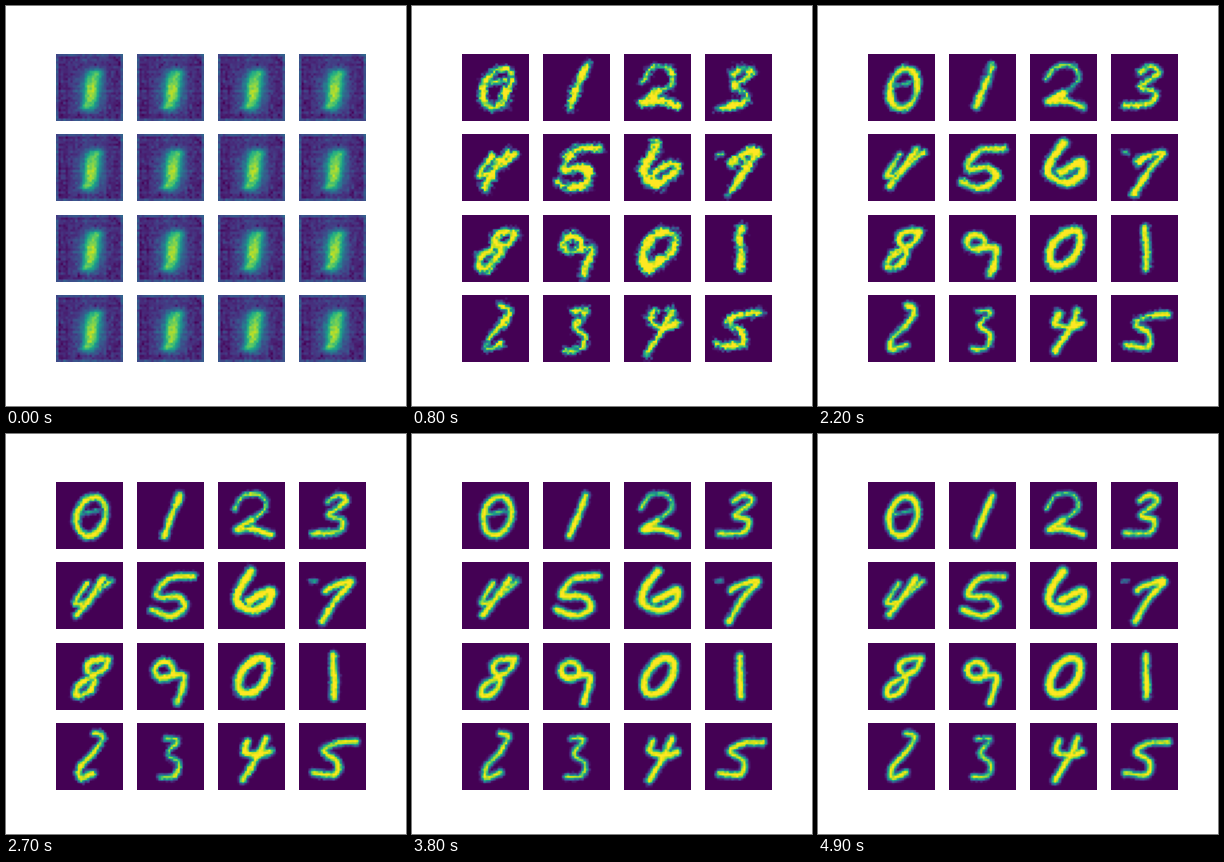
A matplotlib script for the animation above (5.2 s loop, 400 px wide and 400 px high).

```python
import numpy as np
import matplotlib.pyplot as plt
from matplotlib.animation import FuncAnimation

SIZE = 28
LAST = 49
FRAMES = 52
YY, XX = np.mgrid[0:SIZE, 0:SIZE] + 0.5


def line(*coords, ink=1.45):
    """Catmull-Rom stroke through a few key points."""
    points = np.array(coords, float).reshape(-1, 2)
    p = np.vstack([points[0], points, points[-1]])
    t = np.linspace(0, 1, 48 // (len(points) - 1) + 2)[:, None]
    curve = [0.5 * (2 * b + (c - a) * t + (2 * a - 5 * b + 4 * c - d) * t**2
                    + (3 * b - a - 3 * c + d) * t**3)
             for a, b, c, d in zip(p, p[1:], p[2:], p[3:])]
    return np.vstack(curve), ink


def ring(cx, cy, rx, ry, slant=0.0, ink=1.45):
    t = np.linspace(0, 2 * np.pi, 50)
    x = cx + rx * np.cos(t) - slant * ry * np.sin(t)
    return np.column_stack([x, cy + ry * np.sin(t)]), ink


def distance(curve, x, y):
    return np.hypot(x[..., None] - curve[:, 0], y[..., None] - curve[:, 1]).min(axis=2)


def logistic(x):
    return 1 / (1 + np.exp(-np.clip(x, -30, 30)))


def zero():
    return [ring(14.8, 14.3, 5.8, 8.1, 0.15), line(11.5, 13.5, 18, 12, ink=0.4)]


def slanted_zero():
    return [ring(14.7, 13.8, 5.6, 7.6, 0.4, ink=1.85)]


def one(top, bottom):
    return [line(top, 5.5, bottom, 22.5)]


def two():
    return [line(7, 11, 11, 5.5, 18, 5.5, 20, 11, 14, 16, ink=0.7),
            line(14, 16, 8, 20, 14, 19.5, 22, 22)]


def curly_two():
    return [line(16, 4.5, 19.5, 6, 16, 12, 10.5, 18, 10, 23, 16, 20.5, ink=1.2)]


def three():
    return [line(12, 8, 16, 5.5, 19.5, 8, 12.5, 14, 18, 16, 16, 21, 6, 21.5, ink=1.2)]


def faint_three():
    return [line(12, 6.5, 17, 7, 13, 13, 17.5, 17, 16, 22, 10, 22.5, ink=0.9)]


def slanted_four():
    return [line(13, 9, 8, 17, 13, 16, 23, 8, ink=1.1), line(20, 7, 15, 14, 9, 22)]


def four():
    return [line(12, 7.5, 11, 12, 17, 13.5, 22, 12), line(20, 6.5, 17, 13, 10.5, 24)]


def five():
    return [line(23, 6, 13, 7, 8, 14, 17, 14.5, 20, 19, 14, 22.5, 6, 20)]


def wide_five():
    return [line(24, 8, 16, 8.5, 10.5, 12, 16, 16, 15, 21.5, 6, 21, ink=1.25)]


def six():
    return [line(14, 4, 9, 11, 8, 17, 14, 20, 21, 17, 22, 12, 13, 16, ink=1.85)]


def seven():
    return [line(11, 12, 14, 10, 22, 8, 16, 15, 10, 25), line(5, 8, 7, 8, ink=0.2)]


def eight():
    return [line(22, 6.5, 15, 7.5, 13, 11, 16, 15.5, 13, 21, 8.5, 22, 9, 18, 15, 14, 20, 11, 22, 6.5)]


def nine():
    return [ring(11.5, 11.5, 3.8, 3.4), line(12, 14.5, 19.5, 13.5, 19, 19, 17, 25)]


CELLS = [zero(), one(18, 11.3), two(), three(),
         slanted_four(), five(), six(), seven(),
         eight(), nine(), slanted_zero(), one(14.5, 14.8),
         curly_two(), faint_three(), four(), wide_five()]


def drift(seed, frame, scale):
    """Smooth random field that wanders as the frames go by."""
    rng = np.random.default_rng(seed)
    field = np.zeros((SIZE, SIZE))
    for _ in range(5):
        kx, ky = rng.uniform(-1, 1, 2) * scale
        phase, speed = rng.uniform(0, 6.28), rng.uniform(-1, 1)
        field += np.sin(kx * XX + ky * YY + phase + speed * frame)
    return field / 2


def make_blob(index):
    """Untrained output: a glowing column on a faintly patterned ground."""
    shared = np.random.default_rng(4)
    own = np.random.default_rng(index)
    axis = 15.2 - 0.13 * (YY - 14.5)
    column = logistic((2.6 - np.abs(XX - axis)) / 0.8) * logistic((8.2 - np.abs(YY - 15)) / 0.8)
    serif = np.exp(-((XX - 18) / 2) ** 2 - ((YY - 8) / 1.3) ** 2)
    foot = np.exp(-((XX - 11.5) / 2) ** 2 - ((YY - 22) / 1.3) ** 2)
    halo = np.exp(-((XX - 14.5) / 6) ** 2 - ((YY - 15) / 8.5) ** 2)
    value = 0.11 + 0.47 * column + 0.25 * (serif + foot) + 0.33 * halo
    value += 0.015 * (shared.normal(size=(SIZE, 1)) + shared.normal(size=(1, SIZE)))
    value += 0.035 * shared.normal(size=value.shape) + 0.02 * own.normal(size=value.shape)
    edge = np.maximum(np.abs(XX - SIZE / 2), np.abs(YY - SIZE / 2)) > SIZE / 2 - 1
    return np.clip(value + 0.14 * edge, 0, 1)


def make_digit(index, frame):
    """Pen strokes whose warp, patchiness and grain settle with training."""
    rough = np.exp(-frame / 14)
    seed = 10 * index
    x = XX + 1.3 * rough * drift(seed, frame / 3, 0.35)
    y = YY + 1.3 * rough * drift(seed + 1, frame / 3, 0.35)
    level = np.max([ink - distance(curve, x, y) for curve, ink in CELLS[index]], axis=0)
    level += 0.25 * rough + (0.12 + 0.55 * rough) * drift(seed + 2, frame, 0.8)
    grain = np.random.default_rng(1000 * frame + index).normal(size=level.shape)
    value = logistic(level / 0.42 + (0.3 + 1.2 * rough) * grain)
    return np.clip((value - 0.04) / 0.88, 0, 1)


def picture(index, frame):
    early = max(0, 1 - frame / 3) ** 2
    return (1 - early) * make_digit(index, frame) + early * make_blob(index)


fig, axes = plt.subplots(4, 4, figsize=(4, 4), dpi=100)
images = []
for index, ax in enumerate(axes.flat):
    images.append(ax.imshow(picture(index, 0), cmap="viridis", vmin=0, vmax=1))
    ax.axis("off")


def update(i):
    frame = min(i, LAST)
    for index, image in enumerate(images):
        image.set_data(picture(index, frame))
    return images


anim = FuncAnimation(fig, update, frames=FRAMES, interval=100, repeat=True, repeat_delay=0)
plt.show()
```
